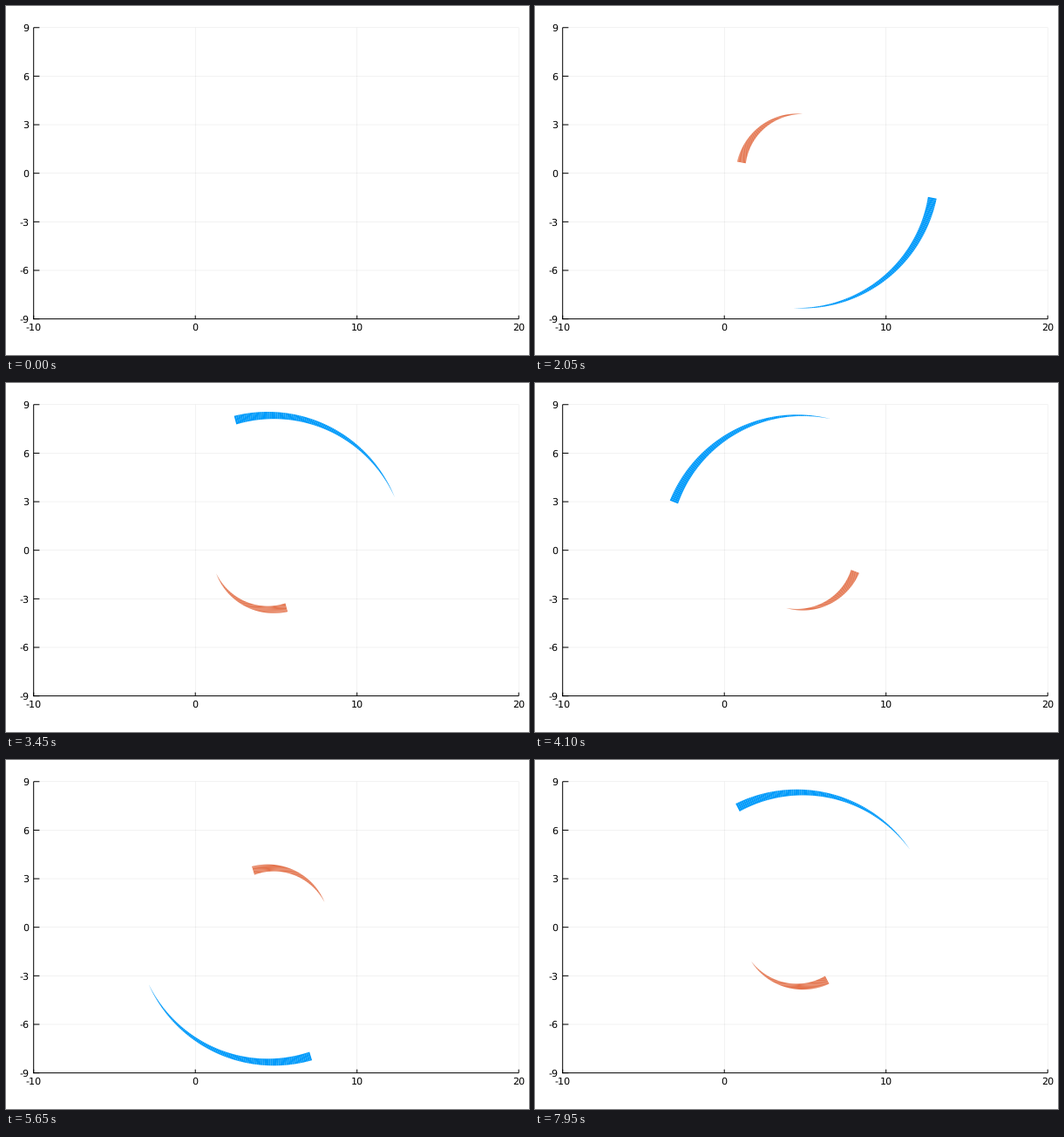
Write a matplotlib script that moves like this. It is 600 px wide and 400 px high and loops after 8 s.

```python
import math

import matplotlib.pyplot as plt
import numpy as np
from matplotlib.animation import FuncAnimation
from matplotlib.collections import LineCollection

W, H, DPI = 600, 400, 100
PX = 72 / DPI                      # one pixel in points
FRAMES, INTERVAL = 160, 50

plt.rcParams["font.family"] = "DejaVu Sans"
plt.rcParams["text.hinting"] = "none"

# Plot area in pixels, y pointing down
LEFT, RIGHT, MID = 31.7, 588.2, 191.7
SCALE = (RIGHT - LEFT) / 30
TOP, BOTTOM = MID - 9 * SCALE, MID + 9 * SCALE

# Two bodies circling their common centre of mass
MASS_A, MASS_B, DIST = 11, 25, 12
MASS = MASS_A + MASS_B
CENTRE = 14 / 3
OMEGA = math.sqrt(MASS / DIST**3)
DT, STEPS = 0.1, 5
TAIL, MAX_WIDTH = 100, 10
BODIES = [
    (DIST * MASS_B / MASS, math.pi, "#009AFA"),
    (DIST * MASS_A / MASS, 0.0, "#E36F47"),
]


def to_px(x, y):
    return LEFT + (x + 10) * SCALE, MID - y * SCALE


fig = plt.figure(figsize=(W / DPI, H / DPI), dpi=DPI, facecolor="white")
ax = fig.add_axes([0, 0, 1, 1])
ax.set_xlim(0, W)
ax.set_ylim(H, 0)
ax.axis("off")


def line(x0, y0, x1, y1, width=1.0, alpha=1.0):
    ax.plot([x0, x1], [y0, y1], color="black", lw=width * PX, alpha=alpha,
            solid_capstyle="butt", snap=False, zorder=1)


def label(x, y, value, align):
    ax.text(x, y, str(value), fontsize=8, color="black",
            ha=align, va="baseline")


def draw_axes():
    for v in range(-10, 21, 10):
        x = to_px(v, 0)[0]
        line(x, TOP, x, BOTTOM, 0.5, 0.1)
        line(x, BOTTOM, x, BOTTOM - 4)
        label(x, 372, v, "center")
    for v in range(-9, 10, 3):
        y = to_px(0, v)[1]
        line(LEFT, y, RIGHT, y, 0.5, 0.1)
        line(LEFT, y, LEFT + 6.7, y)
        label(26.5, y + 4, v, "right")
    line(LEFT, TOP, LEFT, BOTTOM + 0.5)
    line(LEFT - 0.5, BOTTOM, RIGHT, BOTTOM)


def make_trail(color):
    trail = LineCollection([], colors=color, capstyle="butt", zorder=3)
    trail.set_snap(False)
    ax.add_collection(trail, autolim=False)
    return trail


draw_axes()
trails = [make_trail(color) for _, _, color in BODIES]
widths = np.linspace(0, MAX_WIDTH, TAIL) * PX


def update(i):
    head = i * STEPS
    steps = np.arange(max(0, head - TAIL), head + 1)
    for trail, (radius, start, _) in zip(trails, BODIES):
        angle = start + OMEGA * DT * steps
        x, y = to_px(CENTRE + radius * np.cos(angle), radius * np.sin(angle))
        pts = np.column_stack([x, y])
        trail.set_segments(np.stack([pts[:-1], pts[1:]], axis=1))
        trail.set_linewidths(widths[:max(1, len(steps) - 1)])
    return trails


def init():
    return update(0)


anim = FuncAnimation(fig, update, frames=FRAMES, init_func=init,
                     interval=INTERVAL, repeat=True, repeat_delay=0)
plt.show()
```
